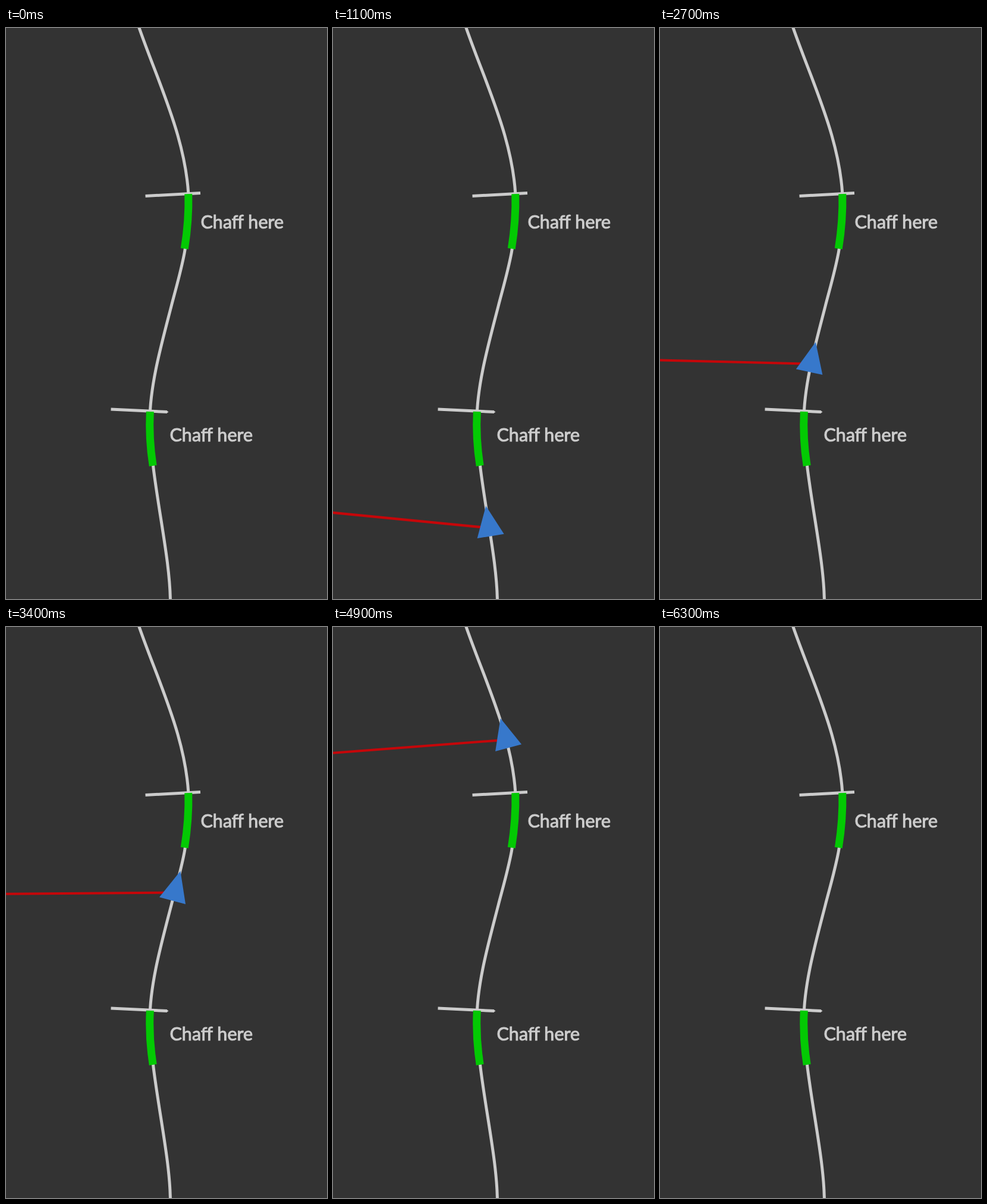
An HTML page that plays this animation: 540 by 960 pixels, repeating every 6.4 s.

```html
<!DOCTYPE html>
<html lang="en">
<head>
<meta charset="utf-8">
<title>Chaff here</title>
<style>
  html, body { margin: 0; height: 100%; overflow: hidden; background: #333; }
  svg { display: block; width: 540px; height: 960px; }
  path, line { fill: none; stroke: #ccc; stroke-width: 5; }
  .zone { stroke: #03c903; stroke-width: 13; }
  #beam { stroke: #c60609; stroke-width: 4; }
  #craft { fill: #3778cb; }
  text { font: 30.5px Lato, sans-serif; fill: #ccc; stroke: #ccc; stroke-width: 1; }
</style>
</head>
<body>
<svg viewBox="0 0 540 960">
  <path id="route" d="M276.5 1031 V965 C276 880 243 760 242 660
    C242 600 262 530 278 468 C290 421 308.5 365 307.5 300
    C307.8 190 252 85 220 -12 L196 -80"/>
  <path d="M234.5 282.5 L327 277.5 M176.5 641 L271 645.5"/>
  <path d="M270 643 L273.5 645.6 L270 648 Z" style="fill:#ccc;stroke:none"/>
  <path class="zone" d="M300.3 371 Q308 323 306.8 279"/>
  <path class="zone" d="M247.2 736 Q240 690 242.3 645"/>
  <text x="327.5" y="337">Chaff here</text>
  <text x="275.5" y="695">Chaff here</text>
  <line id="beam" x1="-3480" y1="475"/>
  <polygon id="craft" points="0,-37.5 22.8,14 -22.8,14"/>
</svg>
<script>
  const LOOP = 6400, STEP = 100, SPEED = 0.1739; // ms, ms, px per ms
  const [route, beam, craft] = ['route', 'beam', 'craft'].map(id => document.getElementById(id));

  function draw(now) {
    const time = Math.floor(now % LOOP / STEP) * STEP;
    const distance = time * SPEED;
    const here = route.getPointAtLength(distance);
    const back = route.getPointAtLength(distance - 2);
    const ahead = route.getPointAtLength(distance + 2);
    const angle = Math.atan2(ahead.x - back.x, back.y - ahead.y) * 180 / Math.PI;
    craft.setAttribute('transform', `translate(${here.x} ${here.y}) rotate(${angle})`);
    beam.setAttribute('x2', here.x);
    beam.setAttribute('y2', here.y);
    requestAnimationFrame(() => draw(performance.now() - start));
  }

  const start = performance.now();
  draw(0);
</script>
</body>
</html>
```
